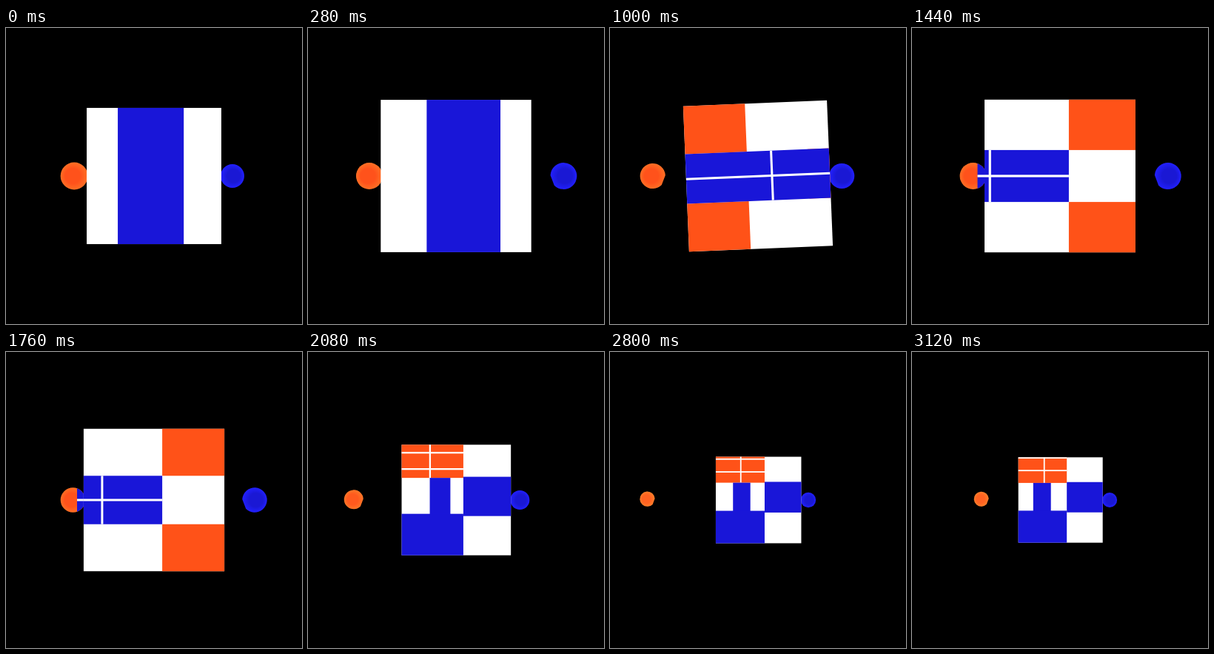
Write an HTML page with a canvas that moves like this. It is 400 px wide and 400 px high and loops after 3160 ms.

```html
<!DOCTYPE html>
<html lang="en">
<head>
<meta charset="utf-8">
<title>Block and two balls</title>
<style>
  html, body { margin: 0; width: 100%; height: 100%; overflow: hidden; background: #000; }
  canvas { display: block; width: 100vmin; height: 100vmin; margin: 0 auto; }
</style>
</head>
<body>
<canvas id="stage" width="400" height="400"></canvas>
<script>
const ctx = document.getElementById('stage').getContext('2d');
const LOOP = 3160, STEP = 40;
const BEAT = 560, FIRST = 40, SLIDE = 600, KEY = 1160, BRICK = 2000;
const ORANGE = '#ff5218', BLUE = '#1916d8', WHITE = '#fff';
// Sizes inside the block are in half widths of the block.
const ROW = 0.34, BAND = 0.98, LINE = 0.031, RADIUS = 0.176;

const mix = (a, b, u) => a + (b - a) * u;

// Smooth step from 0 to 1 between two times.
function ease(t, from, to) {
  const u = Math.min(1, Math.max(0, (t - from) / (to - from)));
  return u * u * (3 - 2 * u);
}

// Slow drift of the last scene, in units of 640 ms.
const drift = t => (t - 2480) / 640;
const grow = t => ease(t, -62, FIRST);
const shrink = t => ease(t, 1760, 2400);

// The block jumps up on each beat, sinks back, and at last settles small.
function halfWidth(t) {
  const age = Math.max(0, t - FIRST) % BEAT;
  const pulse = t < KEY ? 108.5 - 0.0283 * age : 108 - 0.0215 * (t - KEY);
  return mix(57, mix(pulse, 58.5 - 1.5 * drift(t), shrink(t)), grow(t));
}

function leftBall(t) {
  const hop = t < KEY ? 0.312 * ease(t, 640, 900) : 0;
  const trip = 1.45 * (ease(t, 1760, 2400) - ease(t, 2800, 3440));
  return 1.152 + 0.1 * (1 - grow(t)) + hop + trip;
}

function rightBall(t) {
  const hops = ease(t, 40, 240) - ease(t, 400, 600) + ease(t, 1160, 1400) - ease(t, 1760, 2080);
  return 1.165 + 0.265 * hops;
}

const turn = t => t >= SLIDE && t < KEY ? -0.9 - 0.004 * (t - 640) : 0;

// Fill between two corners, trimmed to the block.
function box(x0, y0, x1, y1, color) {
  x0 = Math.max(x0, -1); x1 = Math.min(x1, 1);
  y0 = Math.max(y0, -1); y1 = Math.min(y1, 1);
  if (x1 <= x0 || y1 <= y0) return;
  ctx.fillStyle = color;
  ctx.fillRect(x0, y0, x1 - x0, y1 - y0);
}

const vLine = (x, y0, y1) => box(x - LINE / 2, y0, x + LINE / 2, y1, WHITE);
const hLine = (y, x0, x1) => box(x0, y - LINE / 2, x1, y + LINE / 2, WHITE);

function outerBands(x) {
  box(x, -1, x + BAND, -ROW, ORANGE);
  box(x, ROW, x + BAND, 1, ORANGE);
}

function columnScene(t) {
  const x = -0.538 + 0.33 * ease(t, 0, SLIDE);
  box(x, -1, x + BAND, 1, BLUE);
}

function slideScene(t) {
  const shift = 0.0019 * (t - 520);
  const wipe = mix(-1, 1, ease(t, 720, 920));
  const cross = 0.195 + 0.001 * (t - 1000);
  outerBands(-0.21 - shift);
  box(-0.21 + shift, -ROW, -0.21 + shift + BAND, ROW, ORANGE);
  box(-1, -ROW, wipe, ROW, BLUE);
  hLine(0.002, -1, wipe);
  if (cross < wipe) vLine(cross, -ROW, ROW);
}

function keyScene(t) {
  const x = mix(0.6, 0.117, ease(t, KEY, 1400));
  outerBands(x);
  box(-1, -ROW, x, ROW, BLUE);
  vLine(-0.737 + 0.0006 * (t - 1760), -ROW, ROW);
  hLine(0, -1, x);
}

function brickScene(t) {
  const d = drift(t), x = 0.137 + 0.012 * d;
  box(-1, -1, x, -0.4, ORANGE);
  vLine(-0.444 + 0.058 * d, -1, -0.4);
  for (let y = -0.61 - 0.08 * d; y > -1.1; y -= 0.295) hLine(y, -1, x);
  box(-0.547 - 0.1 * d, -0.4, -0.154 - 0.074 * d, 0.26, BLUE);
  box(-1, 0.25, x, 1, BLUE);
  box(x, -0.42, 1, 0.29, BLUE);
}

function sceneAt(t) {
  if (t < SLIDE) return columnScene;
  if (t < KEY) return slideScene;
  return t < BRICK ? keyScene : brickScene;
}

// side is -1 for left, 1 for right; a free ball has a shallow chord cut off its inner side.
function ball(x, y, r, side, core, rim, free) {
  ctx.save();
  ctx.translate(x, y);
  ctx.scale(side, 1);
  const shade = ctx.createRadialGradient(r * 0.2, 0, r * 0.2, 0, 0, r);
  shade.addColorStop(0, core);
  shade.addColorStop(0.45, core);
  shade.addColorStop(1, rim);
  ctx.beginPath();
  if (free) ctx.arc(0, 0, r, Math.PI * 1.02, Math.PI * 2.75);
  else ctx.arc(0, 0, r, 0, Math.PI * 2);
  ctx.fillStyle = shade;
  ctx.fill();
  ctx.restore();
}

// The middle row reaches out over the inner part of the left ball.
function tab(x, y, r, h) {
  ctx.save();
  ctx.beginPath();
  ctx.arc(x, y, r, 0, Math.PI * 2);
  ctx.clip();
  ctx.fillStyle = BLUE;
  ctx.fillRect(x + r / 3, y - r, r, r * 2);
  ctx.fillStyle = WHITE;
  ctx.fillRect(x + r / 3, y - h * LINE / 2, r, h * LINE);
  ctx.restore();
}

function draw(t) {
  const h = halfWidth(t), r = h * RADIUS, small = shrink(t);
  const mid = 200 + 0.7 * small;
  const left = leftBall(t), right = rightBall(t);
  const lx = mid - h * left, ly = 200 - 1.3 * small;
  const leftR = r + h * 0.08 * (1 - grow(t));
  const warm = g => `rgb(255, ${g + 16 * small}, ${g / 3 + 6 * small})`;

  ctx.setTransform(1, 0, 0, 1, 0, 0);
  ctx.fillStyle = '#000';
  ctx.fillRect(0, 0, 400, 400);

  ball(lx, ly, leftR, -1, warm(82), warm(112), left > 1.25);
  if (sceneAt(t) === keyScene && left < 1.25) tab(lx, ly, r, h);
  ball(mid + h * right, 200, r, 1, '#1a18d4', '#2220ff', right > 1.25);

  ctx.translate(mid, 200);
  ctx.rotate(turn(t) * Math.PI / 180);
  ctx.scale(h, h * 1.012);
  box(-1, -1, 1, 1, WHITE);
  sceneAt(t)(t);
}

const start = performance.now();
function tick() {
  const t = (performance.now() - start) % LOOP;
  draw(Math.floor(t / STEP) * STEP);
  requestAnimationFrame(tick);
}
tick();
</script>
</body>
</html>
```
